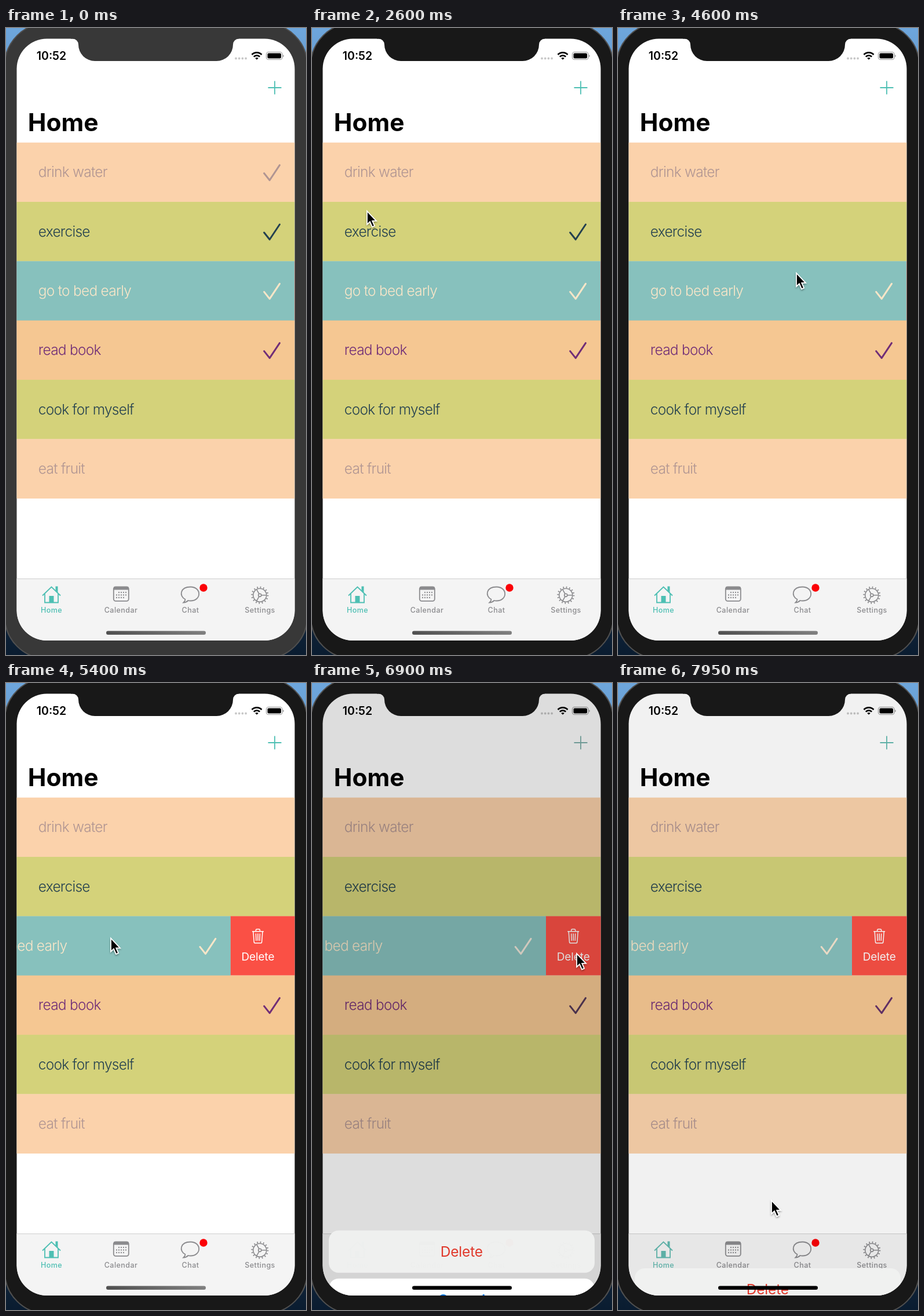
An HTML page for the animation above (8000 ms loop, 518 by 1082 pixels).

```html
<!DOCTYPE html>
<html lang="en">
<head>
<meta charset="utf-8">
<title>Habit list</title>
<style>
  html, body { margin: 0; width: 100%; height: 100%; overflow: hidden; }
  svg { display: block; font-family: Inter, "Open Sans", sans-serif; }
  .bezel { fill: var(--bezel); }
  .item { font-size: 24.5px; font-weight: 300; letter-spacing: -.75px; }
  .check { fill: none; stroke-width: 3; stroke-linecap: round; stroke-linejoin: round; }
  .tab { font-size: 12.5px; font-weight: 500; letter-spacing: .45px; }
  .line { fill: none; stroke: currentColor; stroke-width: 1.8; }
  .tint { color: #4dbfb3; }
  .tint, .check { filter: saturate(var(--vivid)); }
  .gray { color: #8b8b8e; }
  .mid { text-anchor: middle; }
</style>
</head>
<body>
<svg width="518" height="1082" viewBox="0 0 518 1082">
  <defs>
    <linearGradient id="sky" x2="0" y2="1">
      <stop stop-color="#6ea6dc"/><stop offset="1" stop-color="#0a1c30"/>
    </linearGradient>
    <linearGradient id="bar"><stop stop-color="#505050"/><stop offset="1" stop-color="#808080"/></linearGradient>
    <clipPath id="glass"><rect x="18.500" y="18.500" width="480" height="1038.500" rx="52"/></clipPath>
    <filter id="shade" x="-50%" y="-50%" width="200%" height="200%">
      <feDropShadow dx="0" dy="2" stdDeviation="1.5" flood-opacity=".35"/>
    </filter>
  </defs>

  <rect width="518" height="1082" fill="url(#sky)"/>
  <rect class="bezel" x="-2" y="-8" width="522" height="1096" rx="72" stroke="#505050" stroke-width="2"/>

  <g clip-path="url(#glass)">
    <rect x="18" y="18" width="481" height="1040" fill="#fff"/>
    <path class="line tint" stroke-width="2" d="M452.500 103H475.500M464 91.500V114.500"/>
    <text x="37.800" y="177.800" font-size="42.400" font-weight="700">Home</text>
    <g id="rows"></g>

    <rect x="18" y="950" width="481" height="107" fill="#f4f4f4"/>
    <path d="M18 950.500h481" stroke="#cfcfcf"/>
    <g class="tint">
      <path class="line" d="M63 979.500L78.500 964.500L94 979.500M67 976.500V991.500H90V976.500"/>
      <path fill="currentColor" d="M74.500 980h8v11h-8zM85.500 963.500h4v11l-4-4z"/>
    </g>
    <g class="gray">
      <rect class="line" x="185.800" y="964.300" width="26" height="24.500" rx="3.500"/>
      <path fill="currentColor" d="M186 964.500h25.500v5h-25.500z"/>
      <g id="days" fill="currentColor"></g>
      <path class="line" d="M309.500 986C298 980 301 964.500 318.500 964.500C338 964.500 338 988.500 318.500 988.500Q316 988.500 314.500 988Q311 991.500 306.500 991.500Q309.500 989 309.500 986Z"/>
      <g fill="none" stroke="currentColor" stroke-width="1.600" transform="translate(438.300 978.800)">
        <circle r="11.500"/>
        <circle r="13.700" stroke-width="2.800" stroke-dasharray="1.700 3.680"/>
        <circle r="2.600"/>
        <path d="M2.600 0H11M-1.300 -2.300L-5.500 -9.700M-1.300 2.300L-5.500 9.700"/>
      </g>
    </g>
    <circle cx="341" cy="966" r="6.700" fill="#fb0207"/>
    <g id="labels" class="tab mid"></g>

    <rect id="dim" x="18" y="18" width="481" height="1040"/>
    <g id="sheet" font-size="24.5" class="mid">
      <rect x="29" width="459" height="73" rx="17" fill="#f0f1f0" opacity=".98"/>
      <text x="258.300" y="45.500" fill="#e0382b" letter-spacing="-.2">Delete</text>
      <rect x="29" y="83" width="459" height="73" rx="17" fill="#fff"/>
      <text x="258.300" y="128.500" fill="#007aff" font-weight="600">Cancel</text>
    </g>
    <rect id="pill" x="173" y="1040.500" width="172" height="6.500" rx="3.250"/>
  </g>

  <path class="bezel" d="M112 17V18.500H115A10 10 0 0 1 125 28.500A28.500 28.500 0 0 0 153.500 57H363.500A28.500 28.500 0 0 0 392 28.500A10 10 0 0 1 402 18.500V17Z"/>
  <text class="mid" x="78.500" y="54.800" font-size="19.5" font-weight="600">10:52</text>
  <path d="M397 52.500h18" stroke="#000" stroke-opacity=".22" stroke-width="3.800" stroke-linecap="round" stroke-dasharray="0 5.700"/>
  <g fill="none" stroke="#000" stroke-width="2.700">
    <path d="M424.500 46A12 12 0 0 1 441.500 46M427.800 49.600A7.300 7.300 0 0 1 438.200 49.600"/>
    <path d="M433 54.800L430.200 52Q433 49.800 435.800 52Z" fill="#000" stroke="none"/>
  </g>
  <rect x="449.500" y="41.500" width="27.500" height="13" rx="3.800" fill="none" stroke="#000" stroke-opacity=".4" stroke-width="1.200"/>
  <rect x="451.500" y="43.500" width="23.500" height="9" rx="2" fill="#000"/>
  <path d="M478.300 46q3 2 0 4.500z" fill="#000" fill-opacity=".45"/>

  <path id="cursor" d="M1 2V25L6 20.300L10 29.300L14 27.500L10.200 18.800H17Z" stroke="#fff" stroke-width="1.800" filter="url(#shade)"/>
</svg>

<script>
const $ = id => document.getElementById(id);
const LOOP = 8000, TOP = 197.7, ROW = 102.33, ACTION = 94.5;
const peach = ['#fbd2ab', '#b09592'], olive = ['#d4d27a', '#24404f'];
const items = [
  ['drink water', peach, 1], ['exercise', olive, 1],
  ['go to bed early', ['#87c1bd', '#fae6c8'], 1], ['read book', ['#f5c792', '#702d77'], 1],
  ['cook for myself', olive, 0], ['eat fruit', peach, 0]
];

// Delete action, waiting just off the right edge of its row
const action = `<rect x="498" width="160" height="${ROW}" fill="#fa5045"/>
  <path fill="none" stroke="#fff" stroke-width="1.500" stroke-linejoin="round" d="M535.700 26.500h20M542.200 26v-1.500q0-2 2-2h3q2 0 2 2v1.500M537.700 27l1.300 17.500q.2 2 2 2h9.400q1.800 0 2-2l1.300-17.500M542.200 30l.5 12.500M545.700 30v12.500M549.200 30l-.5 12.500"/>
  <text class="mid" x="545.700" y="76.700" font-size="19" fill="#fff" letter-spacing="-.1">Delete</text>`;

$('rows').innerHTML = items.map(([name, [back, ink], done], i) => `
  <g id="row${i}" transform="translate(0 ${TOP + i * ROW})">
    ${i == 2 ? action : ''}
    <rect x="18" width="480.500" height="${ROW + .3}" fill="${back}"/>
    <text class="item" x="55.800" y="59.700" fill="${ink}">${name}</text>
    ${done ? `<path id="check${i}" class="check" stroke="${ink}" d="M445.700 53L455.200 65L472.500 39"/>` : ''}
  </g>`).join('');

$('labels').innerHTML = ['Home', 'Calendar', 'Chat', 'Settings'].map((s, i) =>
  `<text x="${78.5 + 120 * i}" y="1008.500" fill="currentColor" class="${i ? 'gray' : 'tint'}">${s}</text>`).join('');

// The month grid lacks its first and last day
$('days').innerHTML = Array.from({ length: 15 }, (_, i) => i == 0 || i == 14 ? '' :
  `<circle cx="${191 + i % 5 * 4}" cy="${974 + Math.floor(i / 5) * 4.5}" r="1.150"/>`).join('');

// Pointer stops: time, x, y
const stops = [
  [250, 520, 420], [1150, 271, 226], [1700, 271, 226], [2500, 94, 314], [3300, 94, 314],
  [4450, 307, 421], [4700, 307, 421], [5300, 180, 438.5], [5600, 180, 438.5],
  [6400, 456, 465], [7000, 456, 465], [7600, 264, 891], [LOOP, 264, 891]
];
const clamp = v => Math.max(0, Math.min(1, v));
const mix = (a, b, u) => a + (b - a) * u;
const smooth = u => u * u * (3 - 2 * u);
const easeOut = u => 1 - (1 - clamp(u)) ** 3;

function pointer(t) {
  const i = Math.max(1, stops.findIndex(s => s[0] > t));
  const [t0, x0, y0] = stops[i - 1], [t1, x1, y1] = stops[i];
  const u = smooth(clamp((t - t0) / (t1 - t0)));
  return [mix(x0, x1, u), mix(y0, y1, u)];
}

// The row follows the pointer, at half speed beyond the action's width
function swipe(t, x) {
  if (t < 4700) return 0;
  const drag = t < 5500 ? 307 - x : 127;
  const pulled = Math.min(drag, ACTION) + Math.max(0, drag - ACTION) / 2;
  return mix(pulled, ACTION, easeOut((t - 5500) / 350));
}

function draw(t) {
  const [x, y] = pointer(t);
  const open = easeOut((t - 6805) / 400) - easeOut((t - 7798) / 400);
  const style = document.documentElement.style;
  style.setProperty('--bezel', t < 1000 ? '#383838' : '#181818');
  style.setProperty('--vivid', 1 - open);
  $('cursor').setAttribute('transform', `translate(${x} ${y})`);
  $('cursor').style.display = t < 250 ? 'none' : '';
  $('check0').style.display = t < 1600 ? '' : 'none';
  $('check1').style.display = t < 3250 ? '' : 'none';
  $('row2').setAttribute('transform', `translate(${-swipe(t, x)} ${TOP + 2 * ROW})`);
  $('dim').setAttribute('opacity', .235 * open);
  $('sheet').setAttribute('transform', `translate(0 ${1057 - 200 * open})`);
  $('pill').setAttribute('fill', open > 0 ? '#000' : 'url(#bar)');
}

function tick() {
  draw(performance.now() % LOOP);
  requestAnimationFrame(tick);
}
tick();
</script>
</body>
</html>
```
